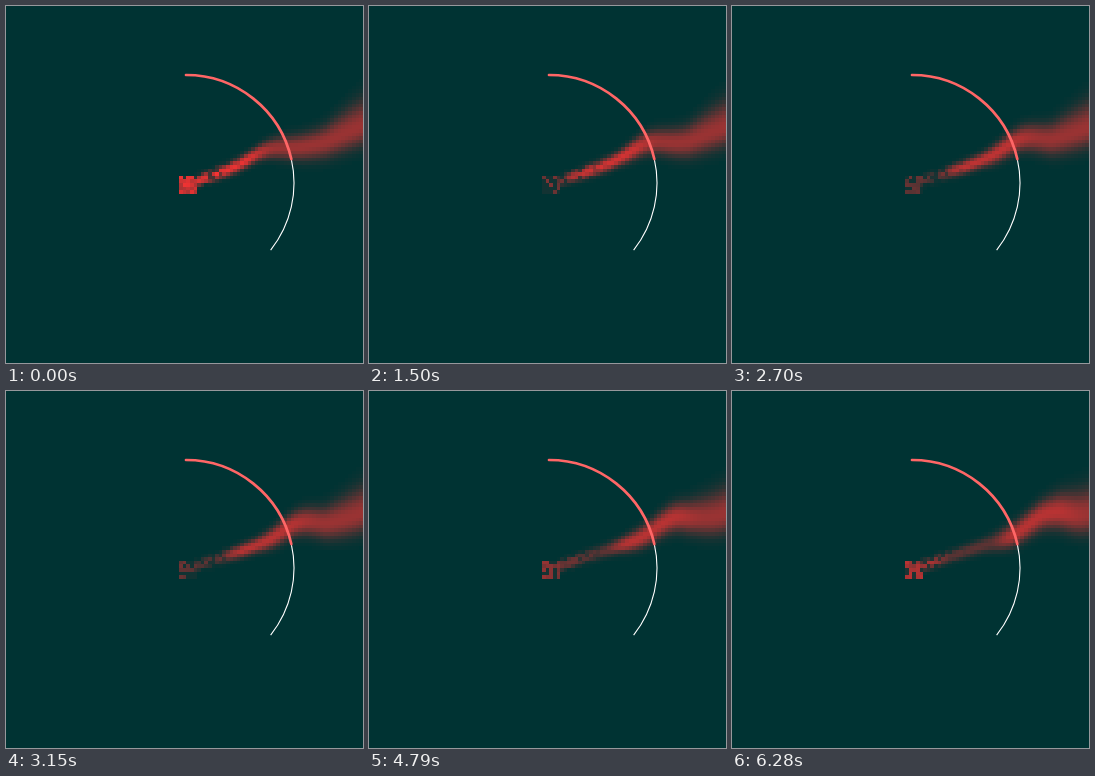
An HTML page with a canvas that plays this animation: 357x357 px, repeating every 6.38 s.

```html
<!DOCTYPE html>
<html lang="en">
<head>
<meta charset="utf-8">
<title>Jet plume</title>
<style>
  html, body { margin: 0; width: 100%; height: 100%; overflow: hidden; background: #033; }
  canvas, svg { position: absolute; left: 0; top: 0; width: 357px; height: 357px; }
</style>
</head>
<body>
<canvas id="plume" width="357" height="357"></canvas>
<svg viewBox="0 0 357 357" fill="none">
  <path id="rest" stroke="#fff" stroke-width="1.1"/>
  <path id="done" stroke="#f66" stroke-width="2.7" stroke-linecap="round"/>
</svg>
<script>
const LOOP = 6380, CELL = 3.6;
const STARTS = [0, 150, 600, 900, 1500, 1800, 2250, 2700, 3150, 3440, 3890, 4340, 4790, 5090, 5530, 5980, 6280];
const ctx = document.getElementById('plume').getContext('2d');

function arc(id, from, to) {
  const at = deg => {
    const a = deg * Math.PI / 180;
    return (180 + 108 * Math.cos(a)).toFixed(2) + ' ' + (177 + 108 * Math.sin(a)).toFixed(2);
  };
  document.getElementById(id).setAttribute('d', `M${at(from)}A108 108 0 0 1 ${at(to)}`);
}
arc('done', -90, -12.8);
arc('rest', -12.8, 38.4);

const mix = (a, b, t) => a + (b - a) * t;
const smooth = (a, b, x) => {
  const t = Math.min(1, Math.max(0, (x - a) / (b - a)));
  return t * t * (3 - 2 * t);
};

// Linear interpolation through [x, y] points
function curve(points, x) {
  let i = 1;
  while (i < points.length - 1 && x > points[i][0]) i++;
  const [x0, y0] = points[i - 1], [x1, y1] = points[i];
  return mix(y0, y1, Math.min(1, Math.max(0, (x - x0) / (x1 - x0))));
}

function hash(a, b) {
  const v = Math.sin(a * 127.1 + b * 311.7) * 43758.5453;
  return v - Math.floor(v);
}

const AXIS = [[176, 180], [205, 170], [250, 155], [285, 145], [320, 136], [357, 120]];
const SPREAD = [[180, 4.8], [220, 6], [250, 7], [270, 10], [300, 13], [330, 16], [357, 18]];
const NOZZLE = [[0, 0.95], [2, 0.75], [4, 0.5], [6, 0.4], [8, 0.45], [12, 0.58], [16, 0.72]];

function speckle(n) {
  return n < 0.3 ? 0.3 : 0.72 + 0.35 * n;
}

// Everything that depends only on the distance from the nozzle
function column(x, step) {
  const crest = 262 + 4.6 * step - 0.08 * step * step;
  const lift = (8 + 0.42 * step) * Math.exp(-(((x - crest) / 25) ** 2));
  const tail = 178 + 5.8 * step, head = 242 + 5.6 * step;
  const core = Math.max(0.72, 0.92 - 0.025 * step);
  const wake = 0.36 + 0.28 * smooth(9, 16, step) * (1 - smooth(200, 222, x));
  const front = smooth(tail - 14, tail + 12, x);
  const ahead = smooth(head - 8, head + 28, x);
  return {
    center: curve(AXIS, x) - lift + step * 0.25 * smooth(325, 357, x),
    below: curve(SPREAD, x),
    above: curve(SPREAD, x) + 7 * smooth(310, 357, x),
    power: mix(mix(wake, core, front), 0.6, ahead),
    grain: 1 - smooth(200, 245, x)
  };
}

function density(col, i, j, x, y, step) {
  const d = y - col.center;
  const profile = Math.exp(-Math.pow(Math.abs(d) / (d < 0 ? col.above : col.below), 2.2));
  const drift = Math.round(step * 1.5);
  const noise = speckle(hash(i - drift, j + Math.round(drift * 0.35)));
  let v = x > 187 ? col.power * profile * mix(1, noise, col.grain) : 0;
  if (i < 53 && j > 46 && j < 52) {
    const level = curve(NOZZLE, step), n = hash(i + step * 7, j);
    const holes = 0.15 + 0.5 * (1 - level);
    v = Math.max(v, level * (n < holes ? 0.15 : 0.6 + 0.4 * n));
  }
  return v;
}

function draw(step) {
  ctx.fillStyle = '#033';
  ctx.fillRect(0, 0, 357, 357);
  for (let i = 48; i < 100; i++) {
    const left = Math.round(i * CELL + 0.3), right = Math.round((i + 1) * CELL + 0.3);
    const x = (left + right) / 2, col = column(x, step);
    for (let j = 14; j < 54; j++) {
      const top = Math.round(j * CELL + 0.6), bottom = Math.round((j + 1) * CELL + 0.6);
      const v = density(col, i, j, x, (top + bottom) / 2, step);
      if (v < 0.01) continue;
      ctx.fillStyle = `rgb(${Math.round(255 * Math.min(1, v))},51,51)`;
      ctx.fillRect(left, top, right - left, bottom - top);
    }
  }
}

const begin = performance.now();
let shown = -1;
function tick() {
  const t = (performance.now() - begin) % LOOP;
  let step = STARTS.length - 1;
  while (STARTS[step] > t) step--;
  if (step !== shown) draw(shown = step);
  requestAnimationFrame(tick);
}
tick();
</script>
</body>
</html>
```
